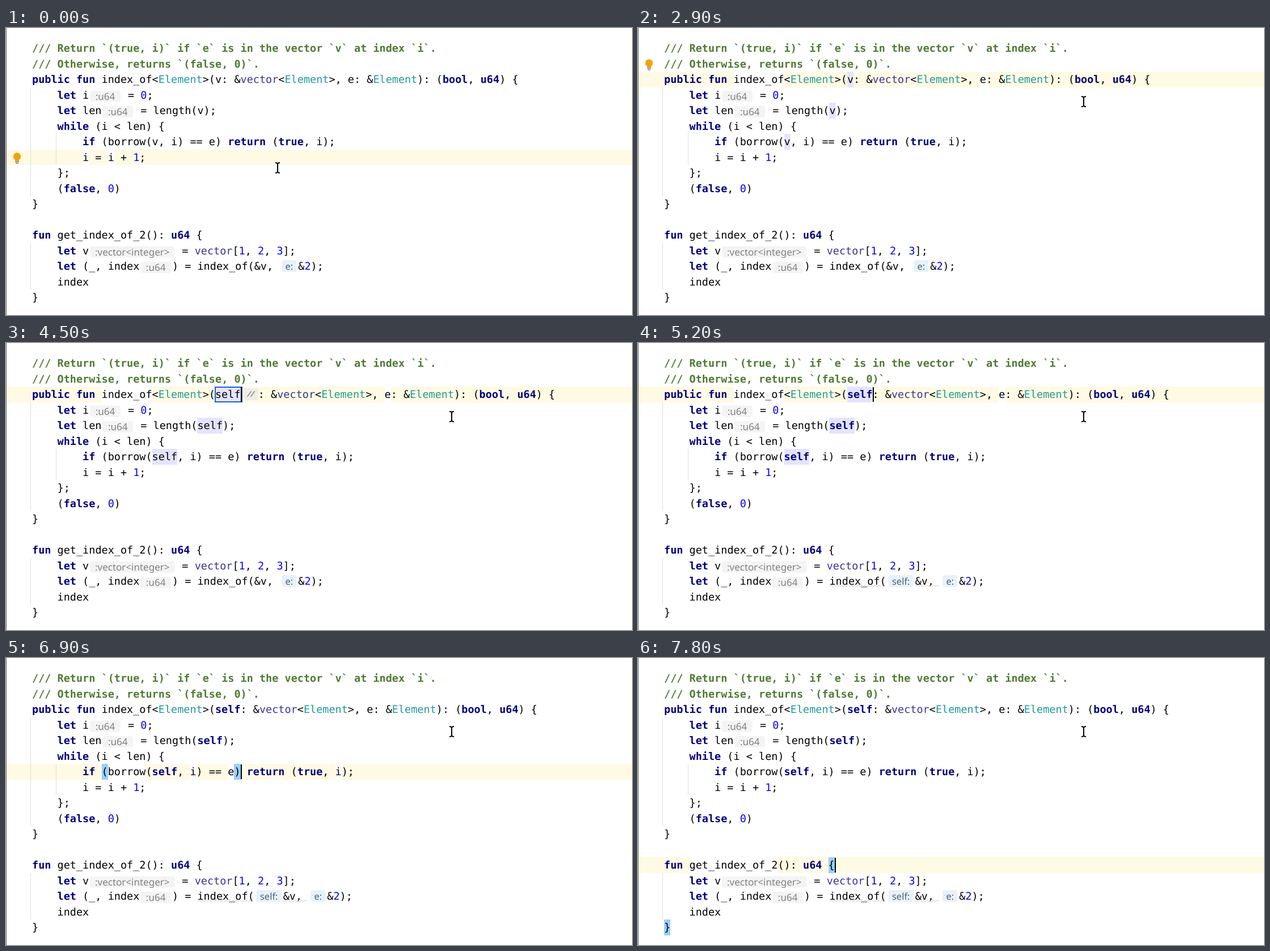
Write an HTML page with a canvas that moves like this. It is 1104 px wide and 507 px high and loops after 8000 ms.

```html
<!DOCTYPE html>
<html lang="en">
<head>
<meta charset="utf-8">
<title>Rename in editor</title>
<style>
html, body { margin: 0; width: 100%; height: 100%; overflow: hidden; background: #fff }
canvas { display: block }
</style>
</head>
<body>
<canvas id="stage" width="1104" height="507"></canvas>
<script>
const ctx = document.getElementById('stage').getContext('2d');
const LOOP = 8000, LEFT = 46, CW = 11.137, ROW = 27.5, TOP = 22;
const MONO = '18.5px "DejaVu Sans Mono", monospace';
const SANS = '"Noto Sans", "Open Sans", sans-serif';
const KEYWORDS = /^(public|fun|let|while|if|return|true|false|bool|u64)$/;
const HINT_WIDTHS = { ':u64': 57.6, ':vector<integer>': 153, 'e:': 33, 'self:': 51 };
const RENAME_WIDTH = 31.3;

// [start time, caret row]
const CARET_ROWS = [[0, 7], [1200, 2], [5500, 3], [5700, 4], [6600, 5], [6800, 6], [7000, 7],
  [7100, 8], [7400, 9], [7500, 10], [7600, 11], [7800, 12]];

// [from, to, row, token, nth, row, token, nth]
const BRACES = [
  [1200, 2200, 2, '(', 0, 2, ')', 0],
  [6700, 6800, 5, '{', 0, 8, '}', 0],
  [6900, 7000, 6, '(', 0, 6, ')', 1],
  [7400, 7500, 9, '(', 0, 9, ')', 0],
  [7500, 7600, 2, '{', 0, 10, '}', 0],
  [7800, 8000, 12, '{', 0, 16, '}', 0]
];

// «» type hint, ‹› parameter hint, ¤ rename button
const source = (name, renaming, selfHint) => `/// Return \`(true, i)\` if \`e\` is in the vector \`v\` at index \`i\`.
/// Otherwise, returns \`(false, 0)\`.
public fun index_of<Element>(${name}${renaming ? '¤' : ''}: &vector<Element>, e: &Element): (bool, u64) {
    let i«:u64» = 0;
    let len«:u64» = length(${name});
    while (i < len) {
        if (borrow(${name}, i) == e) return (true, i);
        i = i + 1;
    };
    (false, 0)
}

fun get_index_of_2(): u64 {
    let v«:vector<integer>» = vector[1, 2, 3];
    let (_, index«:u64») = index_of(${selfHint ? '‹self:›' : ''}&v, ‹e:›&2);
    index
}`.split('\n');

function layout(line) {
  const parts = line.startsWith('///') ? [line] : line.match(/«.+?»|‹.+?›|¤|\w+|\s+|[^\w\s]/g) || [];
  let x = LEFT;
  return parts.map(text => {
    const kind = { '«': 'type', '‹': 'param', '¤': 'rename' }[text[0]] || 'code';
    if (kind === 'type' || kind === 'param') text = text.slice(1, -1);
    const w = kind === 'code' ? text.length * CW : kind === 'rename' ? RENAME_WIDTH : HINT_WIDTHS[text];
    const token = { text, kind, x, w };
    x += w;
    return token;
  });
}

const rowTop = row => Math.round(TOP + row * ROW);
const isName = k => k.kind === 'code' && /^[a-z_]\w*$/.test(k.text) && !KEYWORDS.test(k.text) && !/^(vector|self)$/.test(k.text);

function rect(x, y, w, h, color) {
  ctx.fillStyle = color;
  ctx.fillRect(x, y, w, h);
}

function cell(row, x, w, color) {
  const y = rowTop(row);
  rect(Math.round(x), y, Math.round(x + w) - Math.round(x), rowTop(row + 1) - y, color);
}

function pill(x, y, w, h, color) {
  ctx.fillStyle = color;
  ctx.beginPath();
  ctx.roundRect(x, y, w, h, 4);
  ctx.fill();
}

function style(text, boldSelf) {
  if (text.startsWith('///')) return ['#4f7a33', true];
  if (KEYWORDS.test(text) || boldSelf && text === 'self') return ['#000080', true];
  if (text === 'Element') return ['#20999d', false];
  if (text === 'vector') return ['#36369b', false];
  return [/^\d+$/.test(text) ? '#0000ff' : '#000', false];
}

function drawToken({ text, kind, x, w }, row, boldSelf) {
  const y = TOP + row * ROW;
  if (kind === 'code') {
    const [color, bold] = style(text, boldSelf);
    ctx.font = (bold ? 'bold ' : '') + MONO;
    ctx.fillStyle = color;
    ctx.fillText(text, x, y + 20);
  } else if (kind === 'rename') {
    pill(x + 5, y + 3, w - 5, 21, '#f0eee4');
    ctx.strokeStyle = '#8c8c8c';
    ctx.lineWidth = 1.5;
    ctx.beginPath();
    for (const dx of [12, 18]) {
      ctx.moveTo(x + dx, y + 18);
      ctx.lineTo(x + dx + 7, y + 8);
    }
    ctx.stroke();
  } else {
    const param = kind === 'param';
    pill(x + (param ? 4 : 2), y + (param ? 3 : 6), w - (param ? 7 : 4), param ? 21 : 20, param ? '#e6f2fd' : '#f4f4f4');
    ctx.font = `${param ? 16.5 : 17}px ${SANS}`;
    ctx.textAlign = 'center';
    ctx.fillStyle = param ? '#5a5f66' : '#808080';
    ctx.fillText(text, x + w / 2 + (param ? .5 : 0), y + (param ? 19.5 : 22));
    ctx.textAlign = 'left';
  }
}

function wave(x1, x2, y) {
  ctx.strokeStyle = '#c4c4c4';
  ctx.lineWidth = 1;
  ctx.beginPath();
  for (let x = x1, i = 0; x <= x2; x += 3, i++) ctx.lineTo(x, y + (i % 2 ? -1.5 : 1.5));
  ctx.stroke();
}

function bulb(row) {
  const y = rowTop(row) + 12;
  ctx.fillStyle = '#f0a30a';
  ctx.beginPath();
  ctx.arc(19.5, y, 6.7, 0, 7);
  ctx.fill();
  rect(16, y + 4, 7, 4, '#f0a30a');
  rect(16, y + 8.5, 7, 1.5, '#737a80');
  rect(17, y + 11, 5, 1.5, '#737a80');
}

function pointer(x, y) {
  for (const [color, width] of [['#fff', 4], ['#000', 2]]) {
    ctx.strokeStyle = color;
    ctx.lineWidth = width;
    ctx.beginPath();
    for (const s of [-1, 1]) {
      ctx.moveTo(x - 4, y + s * 9);
      ctx.quadraticCurveTo(x, y + s * 9, x, y + s * 6);
      ctx.quadraticCurveTo(x, y + s * 9, x + 4, y + s * 9);
    }
    ctx.moveTo(x, y - 8);
    ctx.lineTo(x, y + 8);
    ctx.stroke();
  }
}

function pointerAt(t) {
  const mix = (a, b, p) => a + (b - a) * p;
  const glide = Math.min(1, Math.max(0, (t - 100) / 800));
  const p = glide * glide * (3 - 2 * glide);
  if (t < 1300) return [mix(479, 374, p), mix(247, 87, p)];
  return t < 1400 ? [640, 115] : [786, 130];
}

function draw(t) {
  const typed = t < 3600 ? 0 : t < 3700 ? 1 : t < 3800 ? 2 : t < 4000 ? 3 : 4;
  const name = typed ? 'self'.slice(0, typed) : 'v';
  const renaming = t >= 3600 && t < 4800;
  const done = t >= 5200;
  const rows = source(name, renaming, done).map(layout);
  const row = CARET_ROWS.filter(([from]) => from <= t).pop()[1];
  const find = (r, text, n = 0) => rows[r].filter(k => k.text === text)[n];

  rect(0, 0, 1104, 507, '#fff');
  cell(row, 0, 1104, '#fffae3');
  for (const k of rows[row]) if (isName(k)) cell(row, k.x, k.w, '#fff');

  for (const [x, from, to] of [[43, 3, 10], [88, 6, 8], [43, 13, 16]])
    rect(x, rowTop(from), 1, rowTop(to) - rowTop(from), '#dedede');

  const param = find(2, name);
  if (t >= 1200 && t < 5500) {
    const strong = t >= 3600 && t < 4400;
    for (const r of [2, 4, 6]) {
      const k = find(r, name);
      cell(r, k.x, k.w, !strong ? '#e4e4ff' : r === 2 ? '#f0cdff' : '#ccccff');
    }
  }
  for (const [from, to, r1, a, n1, r2, b, n2] of BRACES)
    if (t >= from && t < to)
      for (const [r, k] of [[r1, find(r1, a, n1)], [r2, find(r2, b, n2)]]) cell(r, k.x, k.w, '#99ceff');

  rows.forEach((line, r) => line.forEach(k => drawToken(k, r, done)));

  if (done) {
    const call = find(14, 'index_of'), arg = find(14, '&');
    wave(call.x, call.x + 9 * CW, 429);
    wave(arg.x, arg.x + 4 * CW, 429);
  }
  if (renaming) {
    ctx.strokeStyle = '#1b62d1';
    ctx.lineWidth = 2;
    ctx.strokeRect(369, 78, Math.round(param.w) + 2, 26);
  }

  // The caret keeps its wanted column and stops at shorter line ends.
  const last = rows[row][rows[row].length - 1];
  const end = last ? last.x + last.w : LEFT;
  const caret = row === 2 ? param.x + (typed ? param.w : 0) : Math.min(LEFT + 33 * CW, end);
  if (t >= 1200 && !(t >= 2900 && t < 3200)) rect(Math.round(caret), rowTop(row) + 1, 2, 26, '#000');

  if (t < 1200) bulb(7);
  if (t >= 2900 && t < 3200) bulb(1);
  rect(0, 0, 1, 507, '#6e6e6e');
  if (t < 3400 || t >= 4400) pointer(...pointerAt(t));
}

function frame(now) {
  ctx.textRendering = 'geometricPrecision';
  draw(Math.floor(now % LOOP / 100) * 100);
  requestAnimationFrame(frame);
}
requestAnimationFrame(frame);
</script>
</body>
</html>
```
